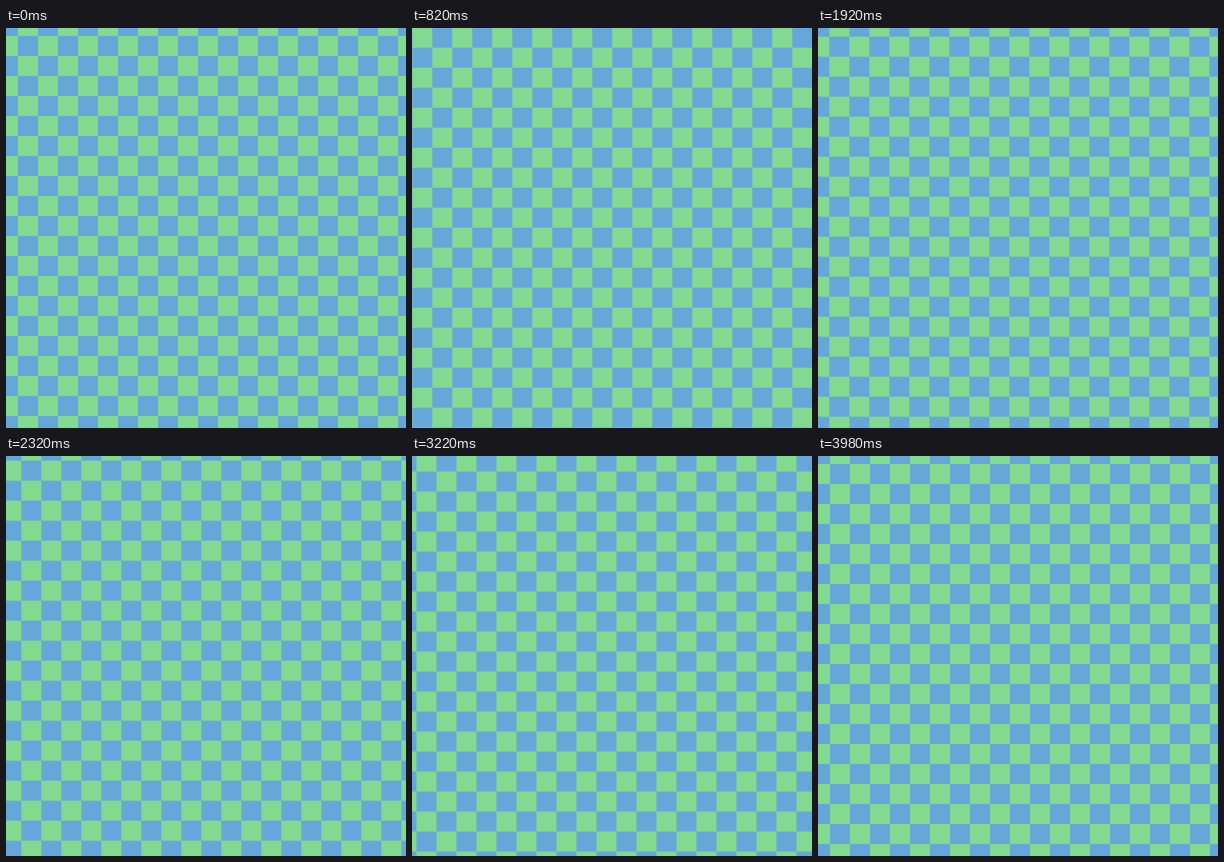
An HTML page with a canvas for the animation above (4000 ms loop, 400 by 400 pixels).

```html
<!DOCTYPE html>
<html lang="en">
<head>
<meta charset="utf-8">
<title>Drifting checkerboard</title>
<style>
  html, body { margin: 0; width: 100%; height: 100%; overflow: hidden; background: #82da91; }
  canvas { display: block; width: 400px; height: 400px; }
</style>
</head>
<body>
<canvas id="stage" width="400" height="400"></canvas>
<script>
const ctx = document.getElementById('stage').getContext('2d');
const SIZE = 400, CELL = 20, LOOP = 4000, STEPS = 160;
const GREEN = '#82da91', BLUE = '#67a6d9';

// 40 steps per second, snapped to a 20 ms clock
function stepAt(ms) {
  const tick = Math.floor(((ms + 1) % LOOP) / 20);
  return Math.ceil((tick + 0.5) / 1.25) - 1;
}

function draw(ms) {
  // the board slides right and up by two cells per loop
  const shift = 2 * CELL * stepAt(ms) / (STEPS - 1);
  const left = 12 + shift - 4 * CELL;
  const top = 8 - shift - 2 * CELL;

  ctx.fillStyle = GREEN;
  ctx.fillRect(0, 0, SIZE, SIZE);
  ctx.fillStyle = BLUE;
  for (let row = 0; row < 26; row++) {
    for (let col = row % 2; col < 26; col += 2) {
      ctx.fillRect(left + col * CELL, top + row * CELL, CELL, CELL);
    }
  }
}

const start = performance.now();
function loop() {
  draw(performance.now() - start);
  requestAnimationFrame(loop);
}
loop();
</script>
</body>
</html>
```
